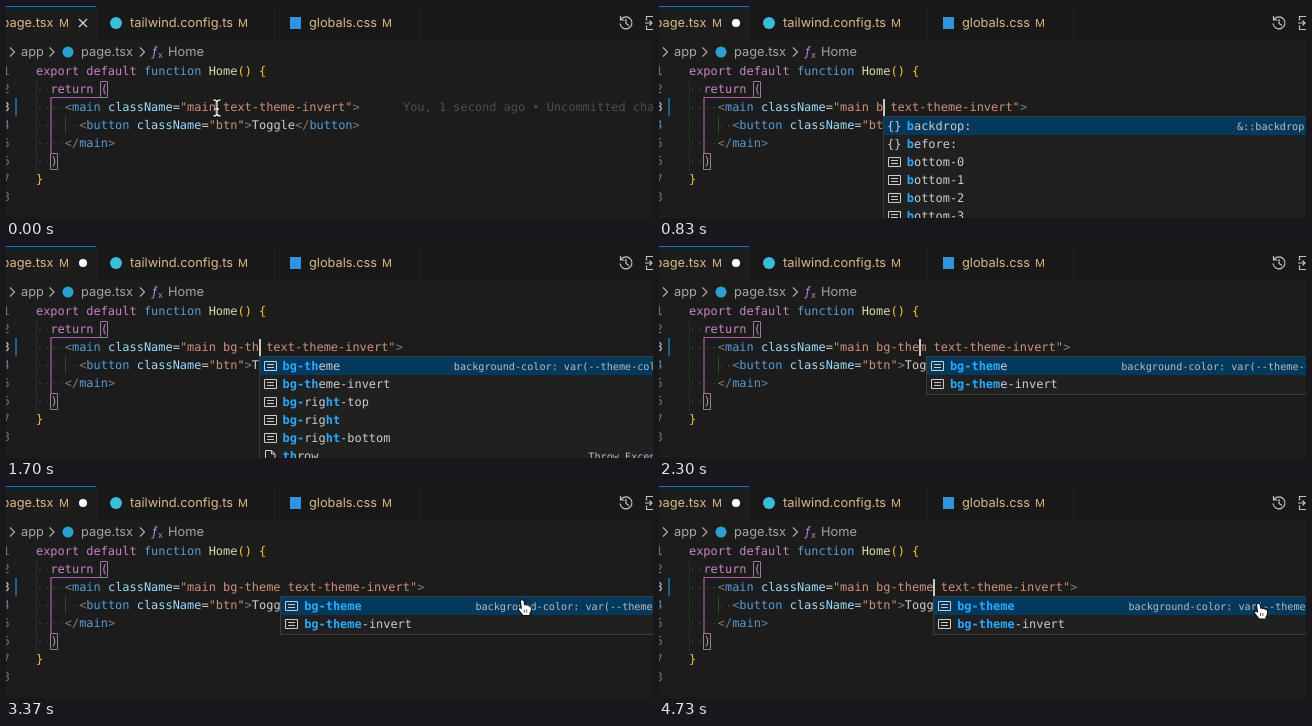
Recreate the animation shown at these times as an HTML page with a canvas. Size 647x212 px, loop 4760 ms.

```html
<!DOCTYPE html>
<html lang="en">
<head>
<meta charset="utf-8">
<title>Editor autocomplete</title>
<style>
  html, body { margin: 0; height: 100%; overflow: hidden; background: #1c1c1c; }
  canvas { display: block; }
</style>
</head>
<body>
<canvas id="stage" width="647" height="212"></canvas>
<script>
const ctx = document.getElementById('stage').getContext('2d');
const LOOP = 4760, COL = 7.195, LEFT = 30, ROW = 18;
const mono = (size, weight = '') => `${weight} ${size}px "DejaVu Sans Mono", monospace`;
const CODE = mono(11.95), BOLD = mono(11.95, 'bold'), DETAIL = mono(10.17);
const UI = '12.8px Inter, sans-serif', BADGE = '11px Inter, sans-serif';
const C = {
  keyword: '#c586c0', storage: '#569cd6', name: '#dcdcaa', gold: '#f2cc30', pink: '#da70d6',
  tag: '#569cd6', attr: '#9cdcfe', string: '#ce9178', punct: '#808080', text: '#cccccc',
  match: '#2aaaff', dim: '#a5a5a5', modified: '#dab988', guide: '#a85fa6', bracket: '#888888'
};

// Keystrokes: time, character
const KEYS = [[350, ' '], [620, 'b'], [1080, 'g'], [1330, '-'], [1500, 't'],
              [1620, 'h'], [1960, 'e'], [2270, 'm'], [2600, 'e']];
const CARET_LAG = 50, CARET_COL = 25;

// Pointer path: time, x, y
const POINTER = [[2750, 211, 102], [2930, 313, 102], [3150, 400, 110],
                 [3450, 560, 127], [3830, 581, 127], [4100, 601, 126]];

// Suggestions by typed text; matched letters stand between asterisks
const THEME_INFO = 'background-color: var(--theme-color);';
const themes = typed => ['', '-invert'].map((end, i) =>
  ['box', `*${typed}*${'bg-theme'.slice(typed.length)}${end}`, i ? '' : THEME_INFO]);
const boxes = (...labels) => labels.map(label => ['box', label]);
const LISTS = {
  'b': [['braces', '*b*ackdrop:', '&::backdrop'], ['braces', '*b*efore:'],
        ...boxes('*b*ottom-0', '*b*ottom-1', '*b*ottom-2', '*b*ottom-3')],
  'bg': [...themes('bg'), ...boxes('*bg*-fixed', '*bg*-local', '*bg*-scroll', '*bg*-top')],
  'bg-': [...themes('bg-'), ...boxes('*bg-*fixed', '*bg-*local', '*bg-*scroll', '*bg-*top')],
  'bg-t': [...themes('bg-t'), ...boxes('*bg-t*op', '*bg-t*ransparent', '*bg-*righ*t*-top', '*bg-*righ*t*')],
  'bg-th': [...themes('bg-th'), ...boxes('*bg-*rig*ht*-top', '*bg-*rig*ht*', '*bg-*rig*ht*-bottom'),
            ['file', '*th*row', 'Throw Exception']]
};
for (const typed of ['bg-the', 'bg-them', 'bg-theme']) LISTS[typed] = themes(typed);

const colX = col => LEFT + col * COL;
const lineY = line => 47 + line * ROW;

function text(str, x, y, color, font = CODE) {
  ctx.font = font;
  ctx.fillStyle = color;
  ctx.fillText(str, x, y);
}
function rect(x, y, w, h, color) {
  ctx.fillStyle = color;
  ctx.fillRect(x, y, w, h);
}
function disc(x, y, r, color) {
  ctx.fillStyle = color;
  ctx.beginPath();
  ctx.arc(x, y, r, 0, 7);
  ctx.fill();
}
function stroke(path, color, width = 1) {
  ctx.strokeStyle = color;
  ctx.lineWidth = width;
  ctx.stroke(new Path2D(path));
}
function code(line, col, ...parts) {
  for (let i = 0; i < parts.length; i += 2) {
    text(parts[i], colX(col), lineY(line) + 4, parts[i + 1]);
    col += parts[i].length;
  }
}

function drawTab(name, nameX, badgeX, edge) {
  text(name, nameX, 21, C.modified, UI);
  text('M', badgeX, 21, C.modified, BADGE);
  rect(edge, 0, 1, 34, '#212121');
}

function drawTabs(dirty) {
  rect(0, 0, 647, 34, '#181818');
  rect(0, 0, 90, 34, '#1c1c1c');
  rect(0, 0, 91, 1, '#0078d4');
  drawTab('page.tsx', -4.5, 53, 90);
  if (dirty) disc(77, 17, 4, '#ffffff');
  else stroke('M73 13l8 8m0-8l-8 8', '#d8d8d8', 1.2);
  disc(110, 17, 6, '#38bdd8');
  drawTab('tailwind.config.ts', 124, 232, 268);
  rect(284, 11, 11, 12, '#2f94dc');
  drawTab('globals.css', 303, 376, 414);
  stroke('M615 13.5a6 6 0 1 1-1 4M614.5 10v4h4M620 13v4.500l3 2', '#c5c5c5', 1.2);
  stroke('M647 10.500h-6.500v4m0 5v4h6.500M639 17h7m-2.500-2.500l2.500 2.500l-2.500 2.500', '#c5c5c5', 1.2);
}

function drawBreadcrumb() {
  for (const x of [4, 43.5, 134]) stroke(`M${x} 41.500l4.500 4.500l-4.500 4.500`, '#b0b0b0', 1.1);
  text('app', 15, 50, C.dim, UI);
  disc(62, 46, 5.5, '#2d9fd0');
  text('page.tsx', 75, 50, C.dim, UI);
  text('ƒ', 146, 50, '#b180d7', 'italic 13px Inter, sans-serif');
  text('x', 152, 52, '#b180d7', '9px Inter, sans-serif');
  text('Home', 162, 50, C.dim, UI);
}

function drawCode(typed) {
  for (let line = 1; line <= 8; line++)
    text(String(line), -3.6, lineY(line) + 4, line === 3 ? '#cccccc' : '#6e7681');
  rect(9, 92, 2, 18, '#1a6294');

  rect(30, 74, 1, 90, '#2d2d2d');
  rect(59, 110, 1, 18, '#404040');
  [2, 4, 6, 4, 2].forEach((indent, i) => {
    for (let col = 0; col < indent; col++)
      rect(colX(col) + 3, lineY(i + 2), 1.3, 1.3, '#464646');
  });
  stroke('M94.500 91.500H45V147', C.guide, 1.2);
  stroke('M94.500 75.500h7v16h-7zM44.500 147.500h7v16h-7z', C.bracket);

  code(1, 0, 'export default ', C.keyword, 'function ', C.storage, 'Home', C.name, '() {', C.gold);
  code(2, 2, 'return ', C.keyword, '(', C.pink);
  code(3, 4, '<', C.punct, 'main ', C.tag, 'className', C.attr, '=', C.text,
    `"main${typed} text-theme-invert"`, C.string, '>', C.punct);
  code(4, 6, '<', C.punct, 'button ', C.tag, 'className', C.attr, '=', C.text, '"btn"', C.string,
    '>', C.punct, 'Toggle', C.text, '</', C.punct, 'button', C.tag, '>', C.punct);
  code(5, 4, '</', C.punct, 'main', C.tag, '>', C.punct);
  code(6, 2, ')', C.pink);
  code(7, 0, '}', C.gold);
  if (!typed) code(3, 51, 'You, 1 second ago • Uncommitted changes', '#4b4e52');
}

function drawIcon(kind, x, y) {
  if (kind === 'braces') text('{}', x - 7, y + 4, C.text);
  else if (kind === 'file')
    stroke(`M${x - 4.5} ${y - 5.5}h6l3.500 3.500v7.500h-9.500zM${x + 1.5} ${y - 5.5}v3.500h3.500`, C.text);
  else
    stroke(`M${x - 5.5} ${y - 4.5}h12v9h-12zM${x - 3} ${y - 1.5}h7m-7 3h7`, C.text);
}

function drawWidget(list, left) {
  const x = Math.ceil(left), height = list.length * ROW + 1;
  rect(x - 1, 110, 432, height + 2, '#3c3c3c');
  rect(x, 111, 430, height, '#202020');
  rect(x, 111, 430, ROW, '#04395e');
  list.forEach(([icon, label, detail = ''], i) => {
    const y = 120 + i * ROW;
    drawIcon(icon, x + 10, y);
    let labelX = left + 23.5;
    label.split('*').forEach((part, j) => {
      text(part, labelX, y + 4, j % 2 ? C.match : C.text, j % 2 ? BOLD : CODE);
      labelX += part.length * COL;
    });
    ctx.textAlign = 'right';
    text(detail, left + 421, y + 4, '#b8bec4', DETAIL);
    ctx.textAlign = 'left';
  });
}

function pointerAt(t) {
  const next = POINTER.findIndex(p => p[0] > t);
  if (next < 0) return POINTER.at(-1).slice(1);
  if (next === 0) return POINTER[0].slice(1);
  const [t0, x0, y0] = POINTER[next - 1], [t1, x1, y1] = POINTER[next];
  const k = (t - t0) / (t1 - t0);
  return [x0 + (x1 - x0) * k, y0 + (y1 - y0) * k];
}

function drawPointer(t) {
  if (t >= KEYS[0][0] && t < POINTER[0][0]) return;
  const [x, y] = pointerAt(t);
  ctx.save();
  ctx.translate(x, y);
  ctx.lineJoin = 'round';
  if (y > 111) {
    const hand = 'M-3-7.500q1.300-1.500 2.600 0l.8 4.500q1.500-1 2.400.3q1.500-.8 2.400.6q1.900-.3 1.900 2q0 3-1.600 5v1.600h-6l-4.500-5.500q-.5-2 2-1l1.200 1z';
    stroke(hand, '#111', 2);
    ctx.fillStyle = '#fff';
    ctx.fill(new Path2D(hand));
    stroke('M.500 1v3m2.300-3v3', '#333', .8);
  } else {
    const beam = 'M-3.500-8q3 0 3.500 2q.500-2 3.500-2M0-6V6M-3.500 8q3 0 3.500-2q.500 2 3.500 2M-2 1h4';
    stroke(beam, '#111', 3.2);
    stroke(beam, '#f2f2f2', 1.4);
  }
  ctx.restore();
}

function draw(t) {
  const pressed = KEYS.filter(key => key[0] <= t);
  const typed = pressed.map(key => key[1]).join('');
  const caretCol = CARET_COL + KEYS.filter(key => key[0] + CARET_LAG <= t).length;
  const lastKey = pressed.length ? pressed.at(-1)[0] : 0;

  rect(0, 0, 647, 212, '#1c1c1c');
  drawTabs(pressed.length > 0);
  drawBreadcrumb();
  drawCode(typed);
  const list = LISTS[typed.trim()];
  if (list) drawWidget(list, colX(CARET_COL + typed.length));
  if (Math.floor((t - lastKey) / 500) % 2 === 0)
    rect(Math.floor(colX(caretCol)), 93, 2, 17, '#c8c8c8');
  drawPointer(t);
}

ctx.textRendering = 'geometricPrecision';
function tick() {
  draw(performance.now() % LOOP);
  requestAnimationFrame(tick);
}
tick();
</script>
</body>
</html>
```
